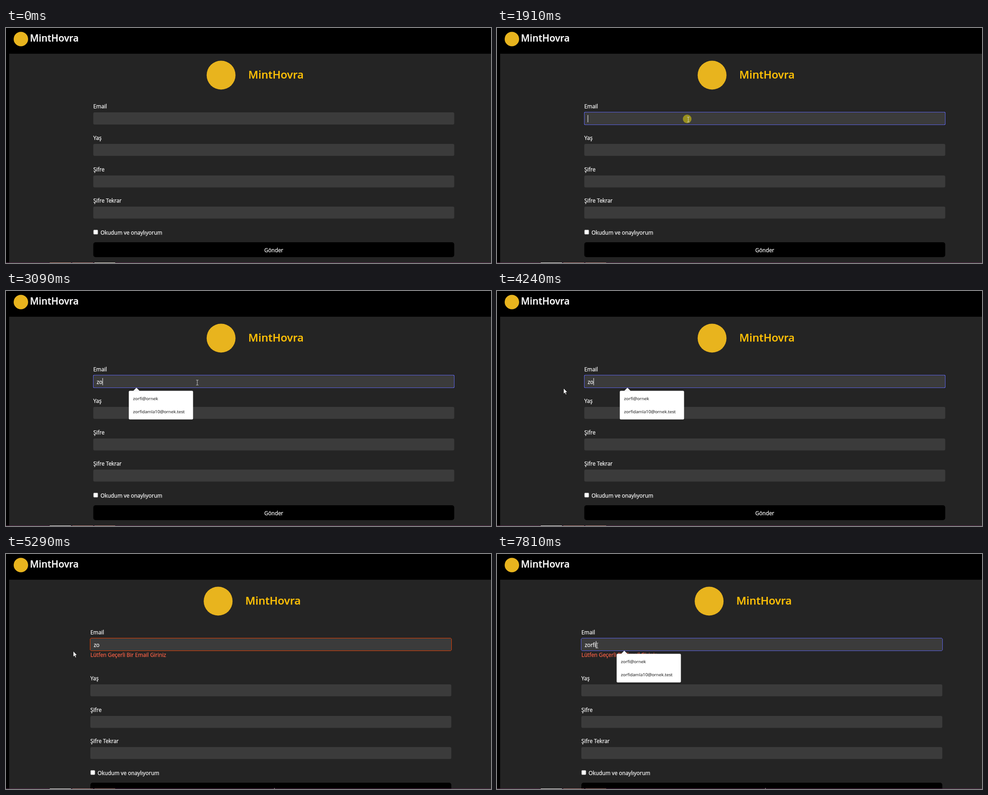
Animation, 1075 px wide and 521 px high, one loop 8 s. Source, as an HTML page:

```html
<!DOCTYPE html>
<html lang="tr">
<head>
<meta charset="utf-8">
<title>MintHovra</title>
<style>
  html, body { margin: 0; width: 100%; height: 100%; overflow: hidden; background: #000; }
  svg { display: block; width: 100%; height: 100%; }
  text {
    font: 11.9px "Open Sans", "Noto Sans", sans-serif;
    color: #fff; fill: currentColor; stroke: currentColor; stroke-width: .25; white-space: pre;
  }
  .brand { font-size: 21.2px; font-weight: 600; }
  .title { font-size: 24.1px; font-weight: 600; color: #ffc107; }
  .error { color: #ff6347; }
  .logo { fill: #e8b41e; }
  .input { fill: #3b3b3b; }
  #ring { fill: none; stroke-opacity: .88; shape-rendering: crispEdges; }
  #popup path, #popup rect { fill: #fff; }
  #popup text { font-size: 9.75px; color: #2c2c2c; stroke-width: .15; }
  #pulse { fill: #ffee00; fill-opacity: .48; }
</style>
</head>
<body>
<svg viewBox="0 0 1075 521" preserveAspectRatio="none">
  <rect width="1075" height="521"/>
  <rect x="7" y="57" width="1068" height="464" fill="#242424"/>
  <circle class="logo" cx="33" cy="24.5" r="16"/>
  <text class="brand" x="53" y="30">MintHovra</text>

  <g id="page">
    <circle class="logo" cx="476.7" cy="104.5" r="32"/>
    <text class="title" x="537" y="111.5">MintHovra</text>
    <text x="193.5" y="178">Email</text>
    <rect class="input" x="193.5" y="187" width="800" height="27" rx="3"/>
    <rect id="ring" x="193.1" y="186.5" width="800.85" height="28" rx="3.5"/>
    <text id="typed" x="201" y="205.5"></text>
    <rect id="caret" y="193" width="1" height="16" fill="#fff"/>
    <text id="error" class="error" x="193.5" y="228">Lütfen Geçerli Bir Email Giriniz</text>
    <g id="rest">
      <g id="fields"></g>
      <rect x="193.9" y="447.6" width="9.8" height="9.8" rx="1.6" fill="#fff" stroke="#767676" stroke-width=".8"/>
      <text x="209.5" y="457.5">Okudum ve onaylıyorum</text>
      <rect x="193.5" y="475" width="800" height="33" rx="5"/>
      <text x="593.5" y="496.8" text-anchor="middle">Gönder</text>
    </g>
  </g>

  <g id="popup">
    <path d="M282 221.6L289.1 214.4L296.2 221.6Z"/>
    <rect id="sheet" x="272.2" y="221.3" width="142.4" rx="2.5"/>
    <g id="rows"></g>
  </g>

  <rect y="520" width="1075" height="1" fill="#56284a"/>
  <rect id="tabA" x="97" y="520" width="47" height="1"/>
  <rect x="147" y="520" width="46" height="1" fill="#bd8484"/>
  <rect id="tabB" x="196" y="520" width="46" height="1"/>

  <g id="cursor">
    <circle id="pulse" r="9.6"/>
    <path id="arrow" d="M.5 .3V13.2L3.4 10.5L5.3 14.9L7.4 14L5.5 9.7H9.4Z" fill="#fff" stroke="#000" stroke-width=".8"/>
    <path id="beam" d="M-2.5 -5.5H-.8L0 -5L.8 -5.5H2.5M0 -5V5M-2.5 5.5H-.8L0 5L.8 5.5H2.5" fill="none" stroke="#d0d0d0"/>
  </g>
</svg>
<script>
const LOOP = 8000;
const ids = ["page", "ring", "typed", "caret", "error", "rest", "fields", "popup", "sheet",
  "rows", "tabA", "tabB", "cursor", "pulse", "arrow", "beam"];
const el = Object.fromEntries(ids.map(id => [id, document.getElementById(id)]));

el.fields.innerHTML = ["Yaş", "Şifre", "Şifre Tekrar"].map((label, i) => {
  const y = 69.8 * (i + 1);
  return `<text x="193.5" y="${178 + y}">${label}</text>
    <rect class="input" x="193.5" y="${Math.round(187 + y)}" width="800" height="26.6" rx="3"/>`;
}).join("");

const mails = ["zorfi@ornek", "vatu_nel@ornekev.test", "zorfidamla10@ornek.test", "tulvemka@ornek.test"];

// time, x, y, pointer shape
const moves = [
  [120, 573, 451, "arrow"], [180, 790, 385, "arrow"], [240, 930, 329.5, "beam"],
  [400, 975, 318, "arrow"], [460, 860, 296, "arrow"], [530, 680, 262, "beam"],
  [590, 520, 235, "arrow"], [650, 436, 225, "arrow"],
  [920, 434, 218, "arrow"], [980, 430, 203, "beam"], [1040, 427, 188, "beam"], [1110, 425, 181, "arrow"],
  [1310, 425, 186, "arrow"], [1370, 424, 176, "arrow"],
  [1510, 420, 178, "arrow"], [1570, 413, 182, "arrow"], [1630, 416, 193, "beam"], [1690, 421, 199, "beam"],
  [1910, 424, 203, "beam"],
  [3640, 400, 206, "beam"], [3700, 345, 212, "beam"], [3770, 270, 216, "arrow"], [3840, 225, 217, "arrow"],
  [4100, 205, 217, "arrow"], [4170, 165, 216, "arrow"], [4240, 147, 215, "arrow"],
  [5290, 148.5, 215, "arrow"], [5350, 158, 214, "arrow"], [5420, 178, 210, "arrow"],
  [5490, 208, 205, "beam"], [5550, 222, 203, "beam"]
];
const typing = [[0, ""], [2830, "z"], [3090, "zo"], [7350, "zor"], [7530, "zorf"], [7810, "zorfi"]];
const fades = [[0, 0], [1970, 1], [4550, .77], [4640, .45], [4700, .18], [4760, 0], [5830, .5], [5890, 1]];
const caretOn = [[1910, 2490], [2830, 3640], [4100, 4550], [5830, 6430], [6950, LOOP]];
const clicks = [[1910, 2100], [4550, 4760], [5830, 6070]];

const latest = (steps, t) => steps.findLast(step => step[0] <= t);
const within = (spans, t) => spans.some(([from, to]) => t >= from && t < to);
const show = (node, on) => node.setAttribute("visibility", on ? "visible" : "hidden");
const place = (node, x, y) => node.setAttribute("transform", `translate(${x} ${y})`);

let listed = "";
function listMails(prefix) {
  const matches = mails.filter(mail => mail.startsWith(prefix));
  const key = matches.join();
  if (key === listed) return;
  listed = key;
  el.sheet.setAttribute("height", 6.4 + 28.5 * matches.length);
  el.rows.innerHTML = matches.map((mail, i) => `<text x="281.5" y="${242.3 + 28.5 * i}">${mail}</text>`).join("");
}

function render(t) {
  const invalid = t >= 4550;
  const refocused = t >= 5830;
  place(el.page, invalid ? -6.5 : 0, 0);
  place(el.rest, 0, invalid ? 32 : 0);
  show(el.error, invalid);
  show(el.ring, t >= 1910);
  el.ring.setAttribute("stroke", invalid && !refocused ? "#ff4500" : "#646cff");

  const text = latest(typing, t)[1];
  el.typed.textContent = text;
  el.caret.setAttribute("x", 201 + (text ? el.typed.getComputedTextLength() : 0));
  show(el.caret, within(caretOn, t));

  listMails(text);
  el.popup.setAttribute("opacity", latest(fades, t)[1]);
  place(el.popup, refocused ? -7 : invalid ? 1 : 0, invalid && !refocused ? .5 : 0);

  const switched = t >= 1370;
  el.tabA.setAttribute("fill", switched ? "#f4eeee" : "#c98c82");
  el.tabB.setAttribute("fill", switched ? "#bd8484" : "#f2e8dc");

  const move = latest(moves, t);
  const shape = move && move[3];
  if (move) place(el.cursor, move[1], move[2]);
  show(el.arrow, shape === "arrow");
  show(el.beam, shape === "beam");
  place(el.pulse, shape === "beam" ? -2.5 : 0, shape === "beam" ? -1.5 : 0);
  show(el.pulse, within(clicks, t));
}

const start = performance.now();
function tick() {
  render((performance.now() - start) % LOOP);
  requestAnimationFrame(tick);
}
tick();
</script>
</body>
</html>
```
